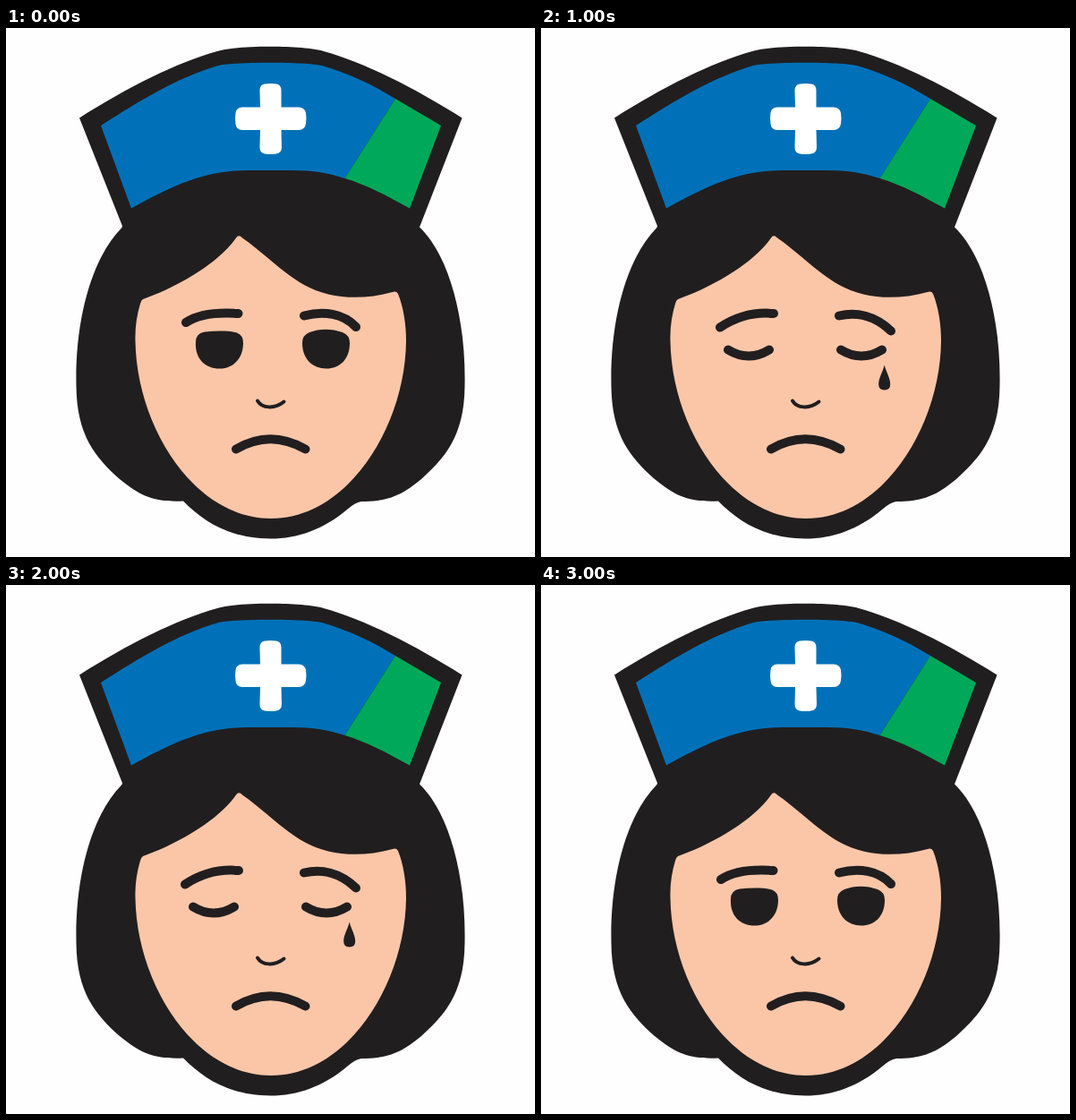
These frames come from a looping animation (591 px wide and 591 px high, 3.5 s). An HTML page:

```html
<!DOCTYPE html>
<html lang="en">
<head>
<meta charset="utf-8">
<title>Sad nurse</title>
<style>
  html, body { margin: 0; width: 100%; height: 100%; overflow: hidden; background: #fefefe; }
  svg { display: block; width: 100%; height: 100%; }
  .ink { fill: #211e1f; }
  .line { fill: none; stroke: #211e1f; stroke-width: 10; stroke-linecap: round; stroke-linejoin: round; }
</style>
</head>
<body>
<svg viewBox="0 0 591 591">
  <!-- hair and cap outline -->
  <path class="ink" d="M82 100.500C136 66 190 39 236 26C258 19 333 19 355 26C401 39 455 66 509.500 100.500L462 222.500
    C495 254 514 325 512.500 400C512 455 491 480 464 504C441 523 426 529 397 529Q390 530 381 538
    C355 560 326 570.500 295.500 570.500C252 570.500 222 553 198 528.500C166 530 150 523 127 504
    C100 480 79 455 78.500 400C77 325 96 257 129 223.500Q130.500 222 129.500 220Z"/>
  <!-- cap -->
  <path fill="#0071b9" d="M106 109C150 81 190 56 237 42C255 37.500 335 37.500 353 42C381 50 409 63 435 79L378.500 168
    C360 162 343 159 320 159L270 159C222 159 186 176 140 201.500Z"/>
  <path fill="#00a859" d="M435 79L486 109L451 201.500C425 187 402 175 378.500 168Z"/>
  <path fill="#fff" d="M284 88.500L283.500 70Q283.500 63 289 62.500Q295.500 61.500 302 62.500Q307.500 63 307.500 70L307.500 88.500
    L327 88.500Q334 89 335 95Q336 101 335 107Q334 113.500 327 114L307.500 114L308 133Q308 140 302 140.500
    Q295.500 141.500 289 140.500Q283.500 140 283.500 133L284 114L264 114Q257 113.500 256.500 107Q255.500 101 256.500 95Q257 89 264 88.500Z"/>
  <!-- face -->
  <path fill="#fbc6a8" d="M257 234.500C240 259 200 286 153 303Q151 304 150 308C146 321 144 335 144.500 350
    C146 445 210 548 296 548C382 548 446 445 447 350C447 331 444 312 438 297Q436 293.500 432 295
    C396 305 360 302 334 287.500C308 273 288 251 264 234.500Q260 230 257 234.500Z"/>
  <path class="line" style="stroke-width:4" d="M281 416.500C286 425 300 426 310.500 417.500"/>
  <path id="eyes" class="ink" d="M212 351Q212 341 222 339.500C235 338 250 338 258 340.500Q265 343 265 352
    C265 370 253 380.500 238.500 380.500C222 380.500 211 369 212 351Z
    M331 352Q331 343 339 340C350 335.500 364 335.500 376 340Q384 343 384 352
    C384 371 372 380.500 358 380.500C342 380.500 331 369 331 352Z"/>
  <path id="teeth" fill="#fff" d="M245 485C255 457 275 443 297 443C319 443 339 457 349 485Z"/>
  <path id="lines" class="line"/>
  <path id="tear" class="ink"/>
</svg>
<script>
  const STEP = 500, COUNT = 7;
  const $ = id => document.getElementById(id);
  const frown = "M257 470.500Q295 448 334.500 470.500";
  const grin = $("teeth").getAttribute("d");

  const drop = (x, top, w, h) =>
    `M${x} ${top}C${x + w * .15} ${top + h * .3} ${x + w / 2} ${top + h * .5} ${x + w / 2} ${top + h * .77}` +
    `Q${x + w / 2} ${top + h} ${x} ${top + h}Q${x - w / 2} ${top + h} ${x - w / 2} ${top + h * .77}` +
    `C${x - w / 2} ${top + h * .5} ${x - w * .15} ${top + h * .3} ${x} ${top}Z`;

  const poses = [
    { brows: "M201 329C216 319 238 317.500 259.500 319M333 321.500C355 315.500 377 319 391 334",
      lids: "", mouth: frown, tear: "", open: true },
    { brows: "M201 329C215 320 238 319 259 323M333 323.500C354 316.500 378 318 391 334",
      lids: "M209 359.500H255M335 359.500H381", mouth: "M257 470.500H334.500", tear: "" },
    { brows: "M200 334.500C219 322 238 317 260 319M333 321.500C352 317 373 321 391 338.500",
      lids: "M209 359.500Q232 373.500 255 359.500M335 359.500Q358 373.500 381 359.500",
      mouth: frown, tear: drop(383.7, 376.5, 13, 28) },
    { brows: "M205.500 323L255 338M337.500 337.500L387 322.500",
      lids: "M209 359.500Q230 346 255 359.500M212 376.500Q226 354 255 359.500" +
            "M381 359.500Q360 346 335 360M376.500 379Q362 357 335 360",
      mouth: grin, tear: drop(383.7, 400.5, 19, 41.5), cry: true }
  ];

  const show = (el, on) => el.setAttribute("visibility", on ? "visible" : "hidden");

  function draw(ms) {
    const step = Math.floor(ms / STEP) % COUNT;
    const pose = poses[3 - Math.abs(3 - step)];
    $("lines").setAttribute("d", pose.brows + pose.lids + pose.mouth);
    $("tear").setAttribute("d", pose.tear);
    show($("eyes"), pose.open);
    show($("teeth"), pose.cry);
  }

  const start = performance.now();
  function tick() {
    draw(performance.now() - start);
    requestAnimationFrame(tick);
  }
  tick();
</script>
</body>
</html>
```
